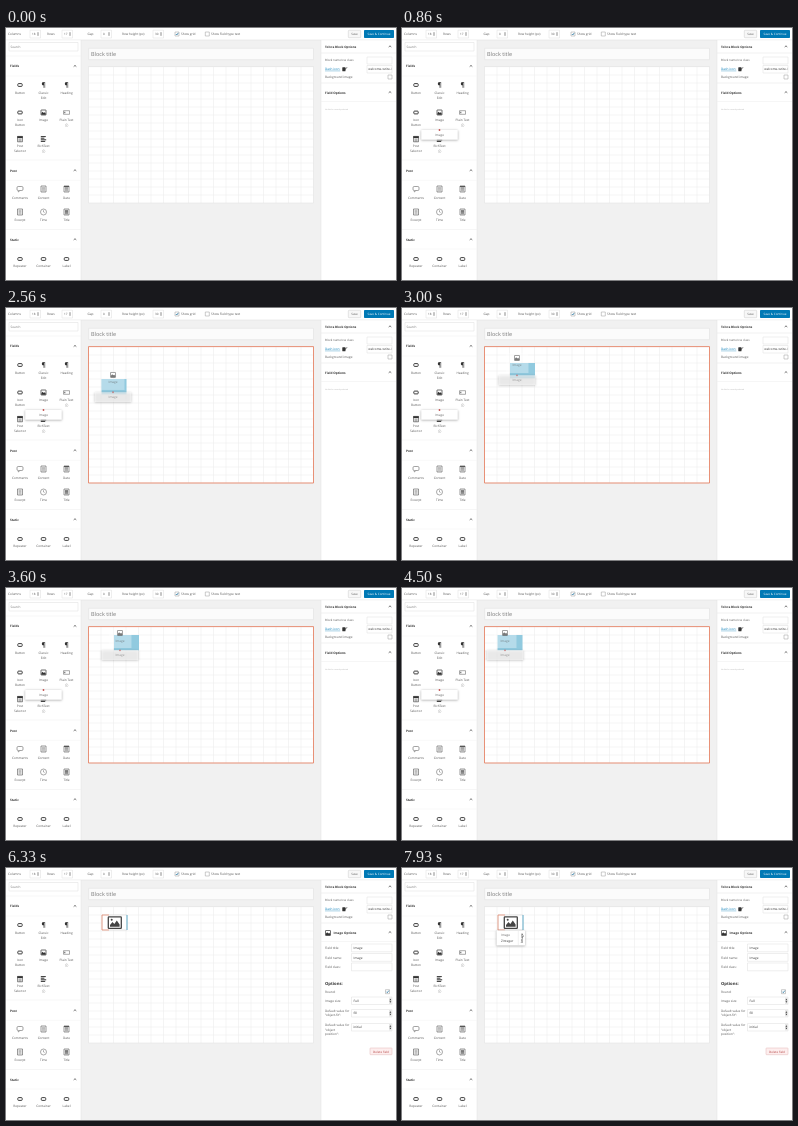
These frames come from a looping animation (390x252 px, 8 s). An HTML page with a canvas:

```html
<!DOCTYPE html>
<html lang="en">
<head>
<meta charset="utf-8">
<title>Block editor</title>
<style>
html, body { margin: 0; width: 100%; height: 100%; overflow: hidden; background: #f1f1f1; }
canvas { display: block; width: 390px; height: 252px; }
</style>
</head>
<body>
<canvas id="stage"></canvas>
<script>
const W = 390, H = 252, LOOP = 8000;
const canvas = document.getElementById('stage');
const ctx = canvas.getContext('2d');
const dpr = Math.max(1, window.devicePixelRatio || 1);
canvas.width = W * dpr;
canvas.height = H * dpr;

const INK = '#333', SOFT = '#555', LINE = '#e2e2e2', BLUE = '#0079b5', RED = '#e8876a';
const GRID = { x: 82.5, y: 39, w: 12.5, h: 8, cols: 18, rows: 17 };
const gridW = GRID.w * GRID.cols, gridH = GRID.h * GRID.rows;

const clamp = (v, a = 0, b = 1) => Math.min(b, Math.max(a, v));
const ease = p => p * p * (3 - 2 * p);
const ramp = (t, a, b) => ease(clamp((t - a) / (b - a)));

function rect(x, y, w, h, fill, stroke, lw = 0.5, r = 0) {
  ctx.beginPath();
  if (r) ctx.roundRect(x, y, w, h, r); else ctx.rect(x, y, w, h);
  if (fill) { ctx.fillStyle = fill; ctx.fill(); }
  if (stroke) { ctx.strokeStyle = stroke; ctx.lineWidth = lw; ctx.stroke(); }
}
function path(points, stroke, lw = 0.5, fill) {
  ctx.beginPath();
  points.forEach(([x, y], i) => i ? ctx.lineTo(x, y) : ctx.moveTo(x, y));
  if (fill) { ctx.fillStyle = fill; ctx.fill(); }
  if (stroke) { ctx.strokeStyle = stroke; ctx.lineWidth = lw; ctx.stroke(); }
}
const hline = (x1, x2, y, color = LINE, lw = 0.5) => path([[x1, y], [x2, y]], color, lw);
function text(s, x, y, { size = 3.15, weight = 400, color = SOFT, align = 'left' } = {}) {
  ctx.font = `${weight} ${size}px "Open Sans", "Noto Sans", sans-serif`;
  ctx.textAlign = align;
  ctx.fillStyle = color;
  ctx.fillText(s, x, y);
}
function faded(alpha, draw) {
  if (alpha <= 0) return;
  ctx.save();
  ctx.globalAlpha *= alpha;
  draw();
  ctx.restore();
}
function check(x, y, on) {
  rect(x, y, 4, 4, '#fff', '#999', 0.5);
  if (on) path([[x + 0.8, y + 2], [x + 1.8, y + 3], [x + 3.3, y + 0.9]], '#1e6f9b', 0.75);
}
const chevron = (x, y) => path([[x - 1.3, y + 0.6], [x, y - 0.6], [x + 1.3, y + 0.6]], INK, 0.7);
const input = (x, y, w, h) => rect(x, y, w, h, '#fff', '#dcdcdc', 0.5);
function select(y, value) {
  input(345.5, y, 40.5, 7.5);
  text(value, 347.5, y + 4.8, { color: INK });
  rect(383, y + 0.5, 2.7, 6.5, '#e6e6e6');
  path([[383.5, y + 3.2], [385.3, y + 3.2], [384.4, y + 1.8]], null, 0, INK);
  path([[383.5, y + 4.3], [385.3, y + 4.3], [384.4, y + 5.7]], null, 0, INK);
}

function page(x, y, lines, lw) {
  rect(x - 2.5, y - 3, 5, 6, '#fff', SOFT, 0.6);
  for (let i = 0; i < lines; i++) hline(x - 1.5, x + 1.5, y - 1.6 + i * 3.4 / (lines - 1), SOFT, lw);
}
const icons = {
  pill(x, y) { rect(x - 2.2, y - 1.4, 4.4, 2.8, '#fff', INK, 0.95, 0.8); },
  para(x, y) { text('¶', x, y + 2.1, { size: 6.4, weight: 700, color: INK, align: 'center' }); },
  image(x, y) {
    rect(x - 2.5, y - 2.5, 5, 5, '#fff', INK, 0.7, 0.3);
    path([[x - 2.2, y + 2.2], [x - 2, y + 0.6], [x - 0.8, y - 0.7], [x + 0.3, y + 0.4], [x + 1.2, y - 0.3], [x + 2.2, y + 0.9], [x + 2.2, y + 2.2]], null, 0, INK);
  },
  field(x, y) { rect(x - 3, y - 1.8, 6, 3.6, '#fff', SOFT, 0.5); hline(x - 2.2, x - 1.2, y, SOFT, 1.4); },
  picker(x, y) {
    rect(x - 2.7, y - 2.8, 5.4, 1.9, INK);
    rect(x - 2.5, y - 2.6, 5, 5.4, null, INK, 0.55);
    for (let i = 0; i < 3; i++) hline(x - 1.6, x + 1.6, y + 0.1 + i, INK, 0.4);
  },
  rich(x, y) {
    [5, 3.6, 5.4, 4.4].forEach((w, i) => hline(x - 2.7, x - 2.7 + w, y - 2.4 + i * 1.6, INK, 1));
  },
  comment(x, y) {
    rect(x - 3, y - 2.5, 6, 4, '#fff', SOFT, 0.55, 1.2);
    path([[x - 1.7, y + 1.5], [x - 1.7, y + 3], [x, y + 1.5]], SOFT, 0.5, '#fff');
  },
  content(x, y) { page(x, y, 4, 0.4); },
  date(x, y) { page(x, y, 4, 0.55); hline(x - 2.5, x + 2.5, y - 2.5, SOFT, 1.1); },
  title(x, y) { page(x, y, 4, 0.8); },
  clock(x, y) {
    ctx.beginPath();
    ctx.arc(x, y, 3, 0, 7);
    ctx.strokeStyle = SOFT; ctx.lineWidth = 0.5; ctx.stroke();
    path([[x, y - 1.8], [x, y], [x + 1.1, y + 0.6]], SOFT, 0.45);
  }
};
const COLS = [14, 37.5, 60.5];
const TILES = [
  [57, 66.2, [['pill', 'Button'], ['para', 'Classic', 'Edit'], ['para', 'Heading']]],
  [84.5, 93, [['pill', 'Icon', 'Button'], ['image', 'Image'], ['field', 'Plain Text', 'ⓘ']]],
  [111, 119.3, [['picker', 'Post', 'Selector'], ['rich', 'RichText', 'ⓘ']]],
  [161, 170.7, [['comment', 'Comments'], ['content', 'Content'], ['date', 'Date']]],
  [184, 192.7, [['content', 'Excerpt'], ['clock', 'Time'], ['title', 'Title']]],
  [231, 239.3, [['pill', 'Repeater'], ['pill', 'Container'], ['pill', 'Label']]]
];

function topBar() {
  rect(0, 0, W, 12, '#fff');
  hline(0, W, 12, '#d8d8d8');
  [['Columns', 2, 24, '18'], ['Rows', 41, 56, '17'], ['Gap', 81.5, 95, '0'], ['Row height (px)', 116, 147, '30']]
    .forEach(([label, x, ix, value]) => {
      text(label, x, 7.2);
      input(ix, 2.2, 10.5, 7.8);
      text(value, ix + 2, 7, { size: 3 });
      path([[ix + 7, 5.5], [ix + 9, 5.5], [ix + 8, 4]], null, 0, '#777');
      path([[ix + 7, 6.5], [ix + 9, 6.5], [ix + 8, 8]], null, 0, '#777');
    });
  check(169, 4, true);
  text('Show grid', 175, 7.2);
  check(199.3, 4, false);
  text('Show Field type text', 205, 7.2);
  rect(342.3, 2.3, 12.4, 7.4, '#f7f7f7', '#ccc', 0.5, 0.7);
  text('Save', 348.5, 7, { size: 3, align: 'center' });
  rect(358, 2, 30, 8, BLUE, null, 0, 0.7);
  text('Save & Continue', 373, 7.1, { size: 3, color: '#fff', align: 'center' });
}

function sidebar() {
  rect(0, 12.3, 75, H, '#fff');
  path([[75, 12], [75, H]], LINE);
  input(3, 14.5, 69, 8.5);
  text('Search', 4.5, 20, { color: '#777' });
  [28, 132, 201.5].forEach(y => hline(0, 75, y, '#ececec'));
  [['Fields', 38], ['Post', 142.3], ['Static', 211.3]].forEach(([s, y]) => {
    text(s, 4, y + 1.3, { weight: 700, color: INK });
    chevron(69, y);
  });
  [48, 152.3, 221].forEach(y => hline(0, 75, y, '#f1f1f1'));
  for (const [iy, ly, row] of TILES) {
    row.forEach(([icon, ...label], i) => {
      icons[icon](COLS[i], iy);
      label.forEach((s, n) => text(s, COLS[i], ly + n * 4.9, { align: 'center' }));
    });
  }
}

function optionsPanel(selected) {
  rect(315, 12.3, 75, H, '#fff');
  path([[315, 12], [315, H]], LINE);
  const bold = { weight: 700, color: INK, size: 3.05 };
  text('Tolvra Block Options', 319, 19.7, bold);
  chevron(384, 18.4);
  hline(315, W, 25);
  text('Block name/css class', 319, 33, { size: 2.95 });
  input(361, 29, 25, 7);
  text('Dash icon:', 319, 42.2, { color: BLUE });
  hline(319, 334.3, 42.9, BLUE, 0.35);
  rect(336.3, 39.2, 3.2, 4, INK, null, 0, 0.5);
  path([[338, 42.5], [341, 39.3]], INK, 0.8);
  input(361, 37.5, 25, 7.5);
  ctx.save();
  ctx.beginPath(); ctx.rect(361, 37.5, 24.4, 8); ctx.clip();
  text('welcome-write-blog', 362.3, 42.3, { color: INK });
  ctx.restore();
  text('Background image:', 319, 50.2);
  check(382, 47, false);
  hline(315, W, 55);
  chevron(384, 64.2);
  hline(315, W, 73.5, '#ececec');
  if (!selected) {
    text('Field Options', 319, 65.5, { ...bold, size: 3.15 });
    text('No field is currently selected', 319, 81.8, { size: 1.75, color: '#aaa' });
    return;
  }
  icons.image(322, 65);
  text('Image Options', 327.5, 66.2, { ...bold, size: 3.15 });
  [['Field title:', 'Image'], ['Field name:', 'Image'], ['Field class:', '']].forEach(([s, v], i) => {
    const y = 76 + i * 9.5;
    text(s, 319, y + 5);
    input(345.5, y, 40.5, 7.8);
    text(v, 347.5, y + 5, { color: INK });
  });
  text('Options:', 319, 116.6, { weight: 700, color: INK, size: 4.2 });
  text('Round:', 319, 125);
  check(379.5, 121.7, true);
  text('Image size:', 319, 133.8);
  select(129, 'Full');
  text('Default value for', 319, 143.6);
  text('"object-fit":', 319, 148.4);
  select(141.5, 'fill');
  text('Default value for', 319, 157.8);
  text('"object', 319, 162.6);
  text('position":', 319, 167.4);
  select(155.5, 'initial');
  rect(364, 180, 22, 6.7, '#fdeeee', '#e3b5b5', 0.5, 0.6);
  text('Delete field', 375, 184.5, { size: 3, color: '#b34141', align: 'center' });
}

function board(active) {
  rect(82.7, 20.3, 224.8, 11.4, '#fbfbfb', '#ddd');
  text('Block title', 85, 28, { size: 5.5, color: '#777' });
  rect(GRID.x, GRID.y, gridW, gridH, '#fff');
  for (let i = 1; i < GRID.cols; i++) {
    const x = GRID.x + i * GRID.w;
    path([[x, GRID.y], [x, GRID.y + gridH]], '#e9e9e9', 0.5);
  }
  for (let i = 1; i < GRID.rows; i++) hline(GRID.x, GRID.x + gridW, GRID.y + i * GRID.h, '#e9e9e9');
  rect(GRID.x, GRID.y - 0.4, gridW, gridH + 0.4, null, '#dedede');
  faded(active, () => rect(GRID.x, GRID.y - 0.4, gridW, gridH + 0.4, null, RED, 0.9));
}

function card(x, y, label) {
  ctx.save();
  ctx.shadowColor = 'rgba(0,0,0,.38)';
  ctx.shadowBlur = 2.4 * dpr;
  ctx.shadowOffsetY = 0.5 * dpr;
  rect(x - 18.3, y, 36.6, 9.8, '#fff', null, 0, 0.4);
  ctx.restore();
  ctx.beginPath();
  ctx.arc(x, y, 0.9, 0, 7);
  ctx.fillStyle = '#c4504f';
  ctx.fill();
  text(label, x, y + 5.9, { align: 'center', color: '#666' });
}

// Drag path: time, icon x, icon y
const DRAG = [
  [1960, 53, 84.5], [2230, 89, 79], [2560, 107, 67], [2760, 111.5, 59.5],
  [3000, 115, 50], [3600, 114, 45], [4130, 103, 45], [4510, 103, 45]
];
function dragAt(t) {
  if (t < DRAG[0][0] || t > 4510) return null;
  const i = Math.max(1, DRAG.findIndex(k => t <= k[0]));
  const [t0, x0, y0] = DRAG[i - 1], [t1, x1, y1] = DRAG[i];
  const p = (t - t0) / (t1 - t0);
  return { x: x0 + (x1 - x0) * p, y: y0 + (y1 - y0) * p };
}

function dragged({ x, y }) {
  if (x >= GRID.x) {
    const col = Math.floor((x - GRID.x) / GRID.w);
    const row = Math.floor((y + 6 - GRID.y) / GRID.h);
    rect(GRID.x + col * GRID.w + 0.5, GRID.y + row * GRID.h, GRID.w * 2, GRID.h * 2 - 0.6, '#91cadf');
  }
  faded(0.32, () => rect(x - 11.5, y - 5, 23, 20, '#fff'));
  faded(0.65, () => {
    icons.image(x, y);
    text('Image', x, y + 8.5, { align: 'center' });
    card(x, y + 17.3, 'Image');
  });
}

function placedField(t) {
  const x = 96, y = 47, w = 25, h = 15;
  faded(ramp(t, 4510, 4760), () => {
    rect(x, y, w, h, '#fff', '#c8c8c8');
    rect(102.3, 48.9, 13, 11.4, '#fff', '#444', 1.3, 0.6);
    path([[104, 58.7], [104, 57], [106.5, 54], [108.3, 56], [110.8, 52.5], [113.6, 56.6], [113.6, 58.7]], null, 0, '#444');
    ctx.beginPath();
    ctx.arc(105.7, 51.8, 1, 0, 7);
    ctx.fill();
  });
  faded(ramp(t, 5270, 5430), () => path([[x + w, y], [x + w, y + h]], '#55a9c9', 0.9));
  faded(ramp(t, 5870, 5960), () => {
    path([[x + 7, y], [x, y], [x, y + h], [x + 7, y + h]], RED, 0.7);
  });
}

function fieldMenu(alpha) {
  faded(alpha, () => {
    ctx.translate(0, 4 * (1 - alpha));
    ctx.save();
    ctx.shadowColor = 'rgba(0,0,0,.38)';
    ctx.shadowBlur = 2.4 * dpr;
    ctx.shadowOffsetY = 0.5 * dpr;
    rect(94.5, 62.5, 28.5, 15, '#fff', null, 0, 0.4);
    ctx.restore();
    text('Image', 99, 67.8, { color: '#666' });
    text('ZInteger', 99, 74.4, { color: INK });
    path([[116.3, 63], [116.3, 77]], LINE);
    ctx.translate(120.7, 70);
    ctx.rotate(-Math.PI / 2);
    text('Image', 0, 0, { weight: 600, color: INK, align: 'center' });
  });
}

function render(t) {
  ctx.setTransform(dpr, 0, 0, dpr, 0, 0);
  ctx.textRendering = 'geometricPrecision';
  rect(0, 0, W, H, '#f1f1f1');
  topBar();
  sidebar();
  optionsPanel(t > 4510);
  board(ramp(t, 2235, 2420) * (1 - ramp(t, 4510, 4760)));

  const brush = 0.35 * ramp(t, 500, 640) * (1 - ramp(t, 660, 800));
  faded(brush, () => card(14, 102 + 4 * (1 - brush), 'Icon Button'));
  const tip = ramp(t, 560, 860) * (1 - ramp(t, 4870, 5130));
  faded(tip, () => card(37.5, 102 + 4 * (1 - tip), 'Image'));

  const drag = dragAt(t);
  if (drag) dragged(drag);
  placedField(t);
  fieldMenu(ramp(t, 4870, 5130) * (1 - ramp(t, 6100, 6330)) + ramp(t, 7500, 7930));
}

const start = performance.now();
function tick() {
  render((performance.now() - start) % LOOP);
  requestAnimationFrame(tick);
}
tick();
</script>
</body>
</html>
```
